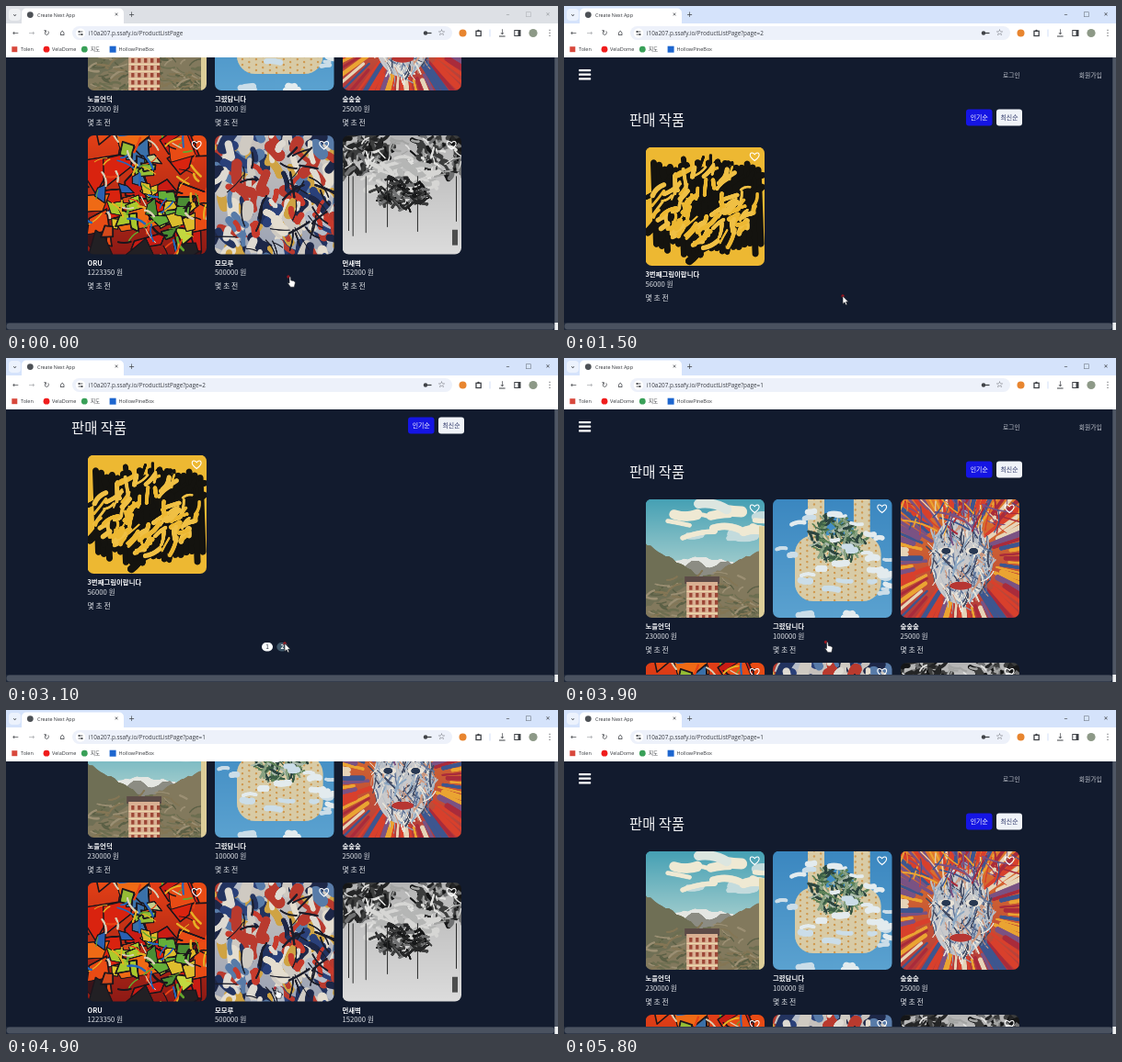
Recreate the animation shown at these times as an HTML page with a canvas. Size 600 by 353 pixels, loop 5900 ms.

```html
<!DOCTYPE html>
<html lang="ko">
<head>
<meta charset="utf-8">
<title>Gallery list</title>
<style>
html, body { margin: 0; width: 100%; height: 100%; overflow: hidden; background: #121b2e; }
canvas { display: block; width: 600px; height: 353px; }
</style>
</head>
<body>
<canvas id="stage"></canvas>
<script>
const W = 600, H = 353, LOOP = 5900, STEP = 100, TOP = 56, SIZE = 129.5, U = 130;
const KR = '"Noto Sans CJK KR", "Noto Sans CJK", sans-serif';
const UI = '"Open Sans", "Noto Sans CJK KR", sans-serif';
const SYM = '"DejaVu Sans", sans-serif';
const stage = document.getElementById('stage');
const dpr = window.devicePixelRatio || 1;
stage.width = W * dpr;
stage.height = H * dpr;
const ctx = stage.getContext('2d');

// ---- helpers ----
function random(seed) {
  return () => {
    seed = (seed + 0x6D2B79F5) | 0;
    let x = Math.imul(seed ^ (seed >>> 15), 1 | seed);
    x = (x + Math.imul(x ^ (x >>> 7), 61 | x)) ^ x;
    return ((x ^ (x >>> 14)) >>> 0) / 4294967296;
  };
}
function oval(c, fill, x, y, rx, ry = rx) {
  c.beginPath();
  c.ellipse(x, y, rx, ry, 0, 0, 7);
  c.fillStyle = fill;
  c.fill();
}
function box(c, fill, x, y, w, h, r = 0) {
  c.beginPath();
  c.roundRect(x, y, w, h, r);
  c.fillStyle = fill;
  c.fill();
}
function line(c, color, width, x0, y0, x1, y1) {
  c.beginPath();
  c.moveTo(x0, y0);
  c.lineTo(x1, y1);
  c.strokeStyle = color;
  c.lineWidth = width;
  c.stroke();
}
function text(s, x, y, size, color, font = KR, weight = 400, align = 'left') {
  ctx.font = `${weight} ${size}px ${font}`;
  ctx.textAlign = align;
  ctx.fillStyle = color;
  ctx.fillText(s, x, y);
}
function fade(c, from, to) {
  const g = c.createLinearGradient(0, 0, 0, U);
  g.addColorStop(0, from);
  g.addColorStop(1, to);
  box(c, g, 0, 0, U, U);
}
const pick = (rnd, list) => list[Math.floor(rnd() * list.length)];

// curved brush marks spread evenly over an ellipse
function strokes(c, rnd, n, colors, { x = 65, y = 65, rx = 72, ry = 72, len = 14, width = 3, angle = 0, spread = 6 }) {
  for (let i = 0; i < n; i++) {
    const turn = rnd() * 7, r = Math.sqrt(rnd());
    const a = angle + (rnd() - .5) * spread, l = len * (.5 + rnd()) / 2, bend = rnd() - .5;
    const dx = Math.cos(a) * l, dy = Math.sin(a) * l;
    c.save();
    c.translate(x + Math.cos(turn) * r * rx, y + Math.sin(turn) * r * ry);
    c.beginPath();
    c.moveTo(-dx, -dy);
    c.quadraticCurveTo(-dy * bend, dx * bend, dx, dy);
    c.strokeStyle = pick(rnd, colors);
    c.lineWidth = width * (.5 + rnd());
    c.stroke();
    c.restore();
  }
}
function ridge(c, rnd, fill, height) {
  c.beginPath();
  for (let x = -2; x <= U + 2; x += 4) c.lineTo(x, height(x) + rnd() * 3);
  c.lineTo(U, U);
  c.lineTo(0, U);
  c.fillStyle = fill;
  c.fill();
}
// angular outlined pieces around a point
function shards(c, rnd, n, colors, x, y, reach, size) {
  for (let i = 0; i < n; i++) {
    const px = x + (rnd() - .5) * reach, py = y + (rnd() - .5) * reach;
    c.beginPath();
    for (let k = 0; k < 4; k++) {
      const a = (k + rnd() * .8) * Math.PI / 2, r = size * (.4 + rnd() * .8);
      c.lineTo(px + Math.cos(a) * r, py + Math.sin(a) * r);
    }
    c.closePath();
    c.fillStyle = pick(rnd, colors);
    c.fill();
    c.strokeStyle = '#1b151c';
    c.lineWidth = 1 + rnd();
    c.stroke();
  }
}

// ---- pictures, each on a 130 unit square ----
function valley(c, rnd) {
  fade(c, '#45a0b4', '#e6eee0');
  strokes(c, rnd, 16, ['#dce6e0', '#efe9d3', '#c3dbdd'], { x: 80, y: 26, rx: 55, ry: 22, len: 26, width: 9, spread: .4 });
  ridge(c, rnd, '#e4e6e2', x => 62 + Math.abs(x - 60) * .15);
  ridge(c, rnd, '#8c8c83', x => 70 + Math.sin(x / 5) * 4);
  ridge(c, rnd, '#6f6f55', x => 47 + x * .6);
  ridge(c, rnd, '#82795d', x => 52 + (U - x) * .5);
  strokes(c, rnd, 190, ['#5c6046', '#9b8f73', '#847655', '#6c6e50'], { y: 112, ry: 32, len: 11, width: 1.8, spread: 1.5 });
  box(c, '#5c4b47', 43, 85, 38, 8);
  box(c, '#d9b093', 45, 91, 34, 39);
  for (let y = 95; y < U; y += 8) {
    box(c, '#ecd7ab', 45, y + 5.5, 34, 1.5);
    for (let x = 48; x < 77; x += 7) box(c, '#9c4736', x, y, 3.2, 4.5);
  }
  box(c, '#dccd98', 124, 30, 6, 100);
}
function bag(c, rnd) {
  fade(c, '#3b87c0', '#5ba2d0');
  c.save();
  c.beginPath();
  c.roundRect(38, -5, 18, 80, 5);
  c.roundRect(88, -5, 18, 80, 5);
  c.roundRect(24, 40, 94, 72, 20);
  c.clip();
  box(c, '#d8cba6', 0, 0, U, U);
  for (let i = 0; i < 360; i++) oval(c, '#cf9a52', i % 18 * 7.5, (i / 18 | 0) * 6 + i % 2 * 3, 1.2);
  c.restore();
  strokes(c, rnd, 170, ['#3d6048', '#5d8257', '#88a282', '#a9b9ab', '#2c4540'], { x: 69, y: 44, rx: 30, ry: 24, len: 9, width: 2.2 });
  strokes(c, rnd, 38, ['#e3ebee', '#cbdde8'], { len: 10, width: 5, spread: .3 });
}
function mask(c, rnd) {
  fade(c, '#e07a2c', '#b23a3c');
  const hues = ['#d8402c', '#eaa432', '#3d568f', '#e6d4b8', '#a92b3b', '#7a5283'];
  for (let i = 0; i < 80; i++) {
    const a = i * Math.PI / 40, r = 35 + rnd() * 25;
    line(c, pick(rnd, hues), 2 + rnd() * 5, 65 + Math.cos(a) * r, 65 + Math.sin(a) * r, 65 + Math.cos(a) * 95, 65 + Math.sin(a) * 95);
  }
  oval(c, '#c9c9cb', 65, 67, 31, 48);
  strokes(c, rnd, 230, ['#e9e5da', '#8ca7c2', '#5f7499', '#cf9a80', '#b6bec6', '#414a62'], { y: 67, rx: 34, ry: 50, len: 16, width: 1.4, angle: 1.5, spread: 2 });
  for (const x of [50, 80]) {
    oval(c, '#e8e2d7', x, 57, 9, 4);
    oval(c, '#283852', x, 57, 5, 3.5);
  }
  oval(c, '#b73632', 66, 95, 12, 4.5);
  strokes(c, rnd, 60, hues, { y: 14, ry: 20, len: 26, width: 1.4, angle: 1.2, spread: 2 });
}
function cubes(c, rnd) {
  fade(c, '#e23f16', '#8e1a15');
  shards(c, rnd, 22, ['#d9230f', '#ef6a15', '#c91c14', '#e84b14'], 65, 50, 135, 26);
  shards(c, rnd, 12, ['#3a141a', '#701319', '#222024'], 65, 118, 120, 18);
  shards(c, rnd, 13, ['#3a70a8', '#95bd35', '#6aa944', '#c5cf8b'], 60, 32, 36, 12);
  shards(c, rnd, 12, ['#a9c92c', '#2960b2', '#e1c72a', '#d4491b'], 36, 82, 44, 11);
  shards(c, rnd, 16, ['#64ae39', '#c2d83f', '#4b8d34', '#ddbd2d'], 87, 85, 48, 12);
  strokes(c, rnd, 80, ['#e84416', '#2466bb', '#e7b124', '#65a82e', '#d9cfb4', '#1b151c'], { len: 13, width: 1.8 });
}
function patches(c, rnd) {
  fade(c, '#c9c3bd', '#9ba3b5');
  const hues = ['#e4ddcf', '#cfcac2', '#2a4079', '#22335f', '#1d2747', '#b5bcc8', '#b93a2e', '#587ba8', '#cfa343'];
  strokes(c, rnd, 300, hues, { rx: 95, ry: 95, len: 15, width: 9, angle: 1.4, spread: 2 });
  strokes(c, rnd, 25, ['#c73a2c', '#dedad2'], { len: 11, width: 6, angle: 1.4, spread: 2 });
  strokes(c, rnd, 40, ['#1b1d2a'], { len: 20, width: 1.8 });
}
function ink(c, rnd) {
  fade(c, '#b5b5b5', '#dcdcdc');
  const dark = ['#151617', '#242526', '#3c3d3d', '#707172'];
  for (const x of [5, 125]) strokes(c, rnd, 170, dark, { x, y: 14, rx: 48, ry: 32, len: 8, width: 4 });
  strokes(c, rnd, 70, ['#e2e2e0', '#a3a4a3'], { y: 25, rx: 68, ry: 25, len: 8, width: 2 });
  strokes(c, rnd, 60, ['#d6d6d4', '#b5b6b5'], { y: 47, rx: 38, ry: 22, len: 14, width: 5, spread: 1.5 });
  strokes(c, rnd, 110, dark, { y: 63, rx: 30, ry: 17, len: 9, width: 2.5, spread: 2.5 });
  for (let i = 0; i < 6; i++) line(c, '#292a2a', 1, 7 + i * i * 4.7, 45, 7 + i * i * 4.7, 85 + rnd() * 35);
  box(c, '#4c4d4d', 120, 103, 6, 17);
}
function graffiti(c, rnd) {
  fade(c, '#edb832', '#edb832');
  for (let x = 9; x < 124; x += 6) line(c, '#14130f', 7, x, 17 + rnd() * 10, x + 3, 103 + rnd() * 15);
  strokes(c, rnd, 60, ['#14130f'], { rx: 58, ry: 47, len: 26, width: 6, angle: 2, spread: 1.6 });
  strokes(c, rnd, 100, ['#edb832', '#f0c044'], { rx: 56, ry: 43, len: 14, width: 4, angle: 2.1, spread: 1.5 });
}
function paint(draw, seed) {
  const cv = document.createElement('canvas');
  cv.width = cv.height = U * 2;
  const c = cv.getContext('2d');
  c.scale(2, 2);
  c.lineCap = c.lineJoin = 'round';
  draw(c, random(seed));
  return cv;
}

const first = [
  ['노을언덕', 230000, valley], ['그렸답니다', 100000, bag], ['숲숲숲', 25000, mask],
  ['ORU', 1223350, cubes], ['모모루', 500000, patches], ['먼새벽', 152000, ink]
].map(([name, price, art], i) => ({ name, price, art: paint(art, 11 + i * 7) }));
const second = [{ name: '3번째그림이랍니다', price: 56000, art: paint(graffiti, 90) }];

// ---- browser frame ----
function icon(s, x, y, size, color = '#3f4247') {
  ctx.textBaseline = 'middle';
  text(s, x, y, size, color, SYM, 400, 'center');
  ctx.textBaseline = 'alphabetic';
}
function chrome(query, focused) {
  const g = '#3f4247', mid = 29.5, soft = focused ? g : '#9a9da2';
  box(ctx, focused ? '#d5e3fb' : '#dde0e5', 0, 0, W, 22);
  box(ctx, '#fff', 0, 19, W, TOP - 19);
  box(ctx, '#fff', 17, 2.5, 111, 19, [5, 5, 0, 0]);
  box(ctx, focused ? '#ecf2fd' : '#eff1f3', 3, 3, 13, 13, 4);
  icon('⌄', 9.5, 8.5, 8);
  oval(ctx, '#4d5156', 26.3, 9.6, 3.4);
  text('Create Next App', 34, 11.7, 5.4, '#303338', UI);
  icon('✕', 120, 9.6, 5.5);
  icon('+', 136.6, 9.6, 8);
  icon('–', 545.5, 9.6, 8, soft);
  icon('□', 567.7, 9.2, 7, soft);
  icon('✕', 589, 9.6, 6, soft);

  icon('←', 10.5, mid, 8);
  icon('→', 28, mid, 8, '#a7a9ad');
  icon('↻', 44, mid, 8);
  icon('⌂', 61, mid, 9);
  box(ctx, '#edf1fa', 72, 22, 413, 15, 7.5);
  oval(ctx, '#fff', 81, mid, 5.2);
  for (const d of [-1.5, 1.5]) {
    line(ctx, g, .8, 78.6, mid + d, 83.4, mid + d);
    oval(ctx, g, 81 + d, mid + d, 1);
  }
  text('i10a207.p.ssafy.io/ProductListPage' + query, 90, 31.7, 6.35, '#3b3e44', UI);
  oval(ctx, g, 456, mid, 2.2);
  line(ctx, g, 1.3, 457, mid, 462.5, mid);
  icon('☆', 473.6, mid, 9.5);
  oval(ctx, '#e8852f', 496.5, mid, 4);
  ctx.strokeStyle = g;
  ctx.strokeRect(511, mid - 2.2, 5.2, 5.2);
  oval(ctx, g, 513.5, mid - 2.5, 1.2);
  line(ctx, '#c8d8f5', .8, 526, 25.5, 526, 33.5);
  icon('↓', 539.3, mid - 1, 8);
  line(ctx, g, 1, 536, 33, 542.6, 33);
  ctx.strokeRect(552.8, 26.5, 6.2, 6);
  box(ctx, g, 556.5, 26.5, 2.5, 6);
  oval(ctx, '#8d9987', 573, mid, 4.6);
  icon('⋮', 591, mid, 9);

  box(ctx, '#d8483c', 6.3, 44.2, 6, 6);
  oval(ctx, '#f01c1c', 44, 47.2, 3.4);
  oval(ctx, '#39a058', 85.3, 47.2, 3.4);
  box(ctx, '#1d66cf', 112.6, 43.7, 7, 7);
  [['Tolen', 16], ['VelaDome', 50], ['지도', 92], ['HollowPineBox', 122.5]]
    .forEach(([s, x]) => text(s, x, 49.2, 5.5, '#34373c', UI));
}

// ---- web page ----
const heart = new Path2D('M0 4.4C-9 -2 -3.4 -7 0 -2.3C3.4 -7 9 -2 0 4.4Z');
const arrow = new Path2D('M0 0V8.6L2 6.8L3.4 9.8L4.8 9.2L3.5 6.3H6Z');
const hand = new Path2D('M-1 0H.4L.8 4L3.6 4.5L5.5 6L4.3 11.2H.3L-3.2 6.4L-1 7Z');

function shape(path, x, y, edge, width, fill) {
  ctx.save();
  ctx.translate(x, y);
  if (fill) { ctx.fillStyle = fill; ctx.fill(path); }
  ctx.strokeStyle = edge;
  ctx.lineWidth = width;
  ctx.stroke(path);
  ctx.restore();
}
function card({ name, price, art }, i) {
  const x = 88.5 + i % 3 * 138.5, y = 153.5 + Math.floor(i / 3) * 178.5;
  ctx.save();
  ctx.beginPath();
  ctx.roundRect(x, y, SIZE, SIZE, 7);
  ctx.clip();
  ctx.drawImage(art, x, y, SIZE, SIZE);
  ctx.restore();
  shape(heart, x + 118.7, y + 10.6, '#fff', 1.1);
  text(name, x, y + 141.8, 7.4, '#f4f5f7', KR, 700);
  text(price + ' 원', x, y + 152.4, 7.7, '#dfe2e7');
  text('몇 초 전', x, y + 167, 7.9, '#dfe2e7');
}
function pill(label, x, y, active) {
  box(ctx, active ? '#40586a' : '#fafbfc', x - 6, y - 4.7, 12, 9.4, 4.7);
  text(label, x, y + 2.4, 6.5, active ? '#fff' : '#27313e', KR, active ? 700 : 400, 'center');
}
function button(label, x, w, fill, color) {
  box(ctx, fill, x, 112.4, w, 18, 3);
  text(label, x + w / 2, 124, 6.9, color, KR, 400, 'center');
}
function page(num, scroll) {
  ctx.save();
  box(ctx, '#121b2e', 0, TOP, W, H - TOP);
  ctx.translate(0, -scroll);
  for (let i = 0; i < 3; i++) box(ctx, '#fff', 16, 69 + i * 4.6, 13.2, 2.2, .6);
  text('로그인', 477, 78.2, 6.8, '#c4c8d0');
  text('회원가입', 559.8, 78.2, 6.8, '#c4c8d0');
  text('판매 작품', 71, 130.3, 15.4, '#f4f5f7');
  button('인기순', 437, 28.5, '#1515e4', '#fff');
  button('최신순', 470, 28, '#f0f3f8', '#30396b');
  (num === 1 ? first : second).forEach(card);
  const y = num === 1 ? 542 : 362.7;
  pill('1', 284, y, num === 1);
  pill('2', 300.3, y, num === 2);
  if (num === 1) text('© 2024 Soir Douvel. All rights reserved.', 303, y + 17.8, 7.2, '#e3e6ea', KR, 400, 'center');
  ctx.restore();

  box(ctx, '#4f5765', 596.3, TOP, 3.7, 289);
  box(ctx, '#20293a', 0, 345, 596.3, 8);
  box(ctx, '#4a5260', .5, 345.6, 595.5, 6.8, 3.4);
  box(ctx, '#eef0f2', 596.3, 345, 3.7, 8);
}

// ---- timeline ----
const ramp = (t, from, to) => Math.min(1, Math.max(0, (t - from) / (to - from)));

function scrollAt(t) {
  if (t < 1300) return 191 + 37 * ramp(t, 100, 600);
  if (t < 3600) return 88.5 * ramp(t, 1900, 2300) - 40.5 * ramp(t, 2500, 3100);
  return 190 * ramp(t, 3900, 4400) - 46 * ramp(t, 4700, 4900) - 144 * ramp(t, 4900, 5200);
}
// the pointer glides between rests: [start, end, dx, dy]
const glides = [[600, 900, -6, 21], [2000, 2300, 0, -5], [3100, 3400, -16.5, -1.5], [3900, 4400, 8, -6.5]];

function pointer(t) {
  let x = 309, y = 295;
  for (const [from, to, dx, dy] of glides) {
    x += dx * ramp(t, from, to);
    y += dy * ramp(t, from, to);
  }
  const pressing = t < 1300 || t >= 3400;
  oval(ctx, 'rgba(176,20,28,.85)', x - (pressing ? 2 : 0), y, 1.7);
  shape(pressing ? hand : arrow, x, y, '#1c1d22', .6, '#fff');
}

function frame(now) {
  const t = Math.floor(now % LOOP / STEP) * STEP;
  const num = t >= 1300 && t < 3600 ? 2 : 1;
  ctx.setTransform(dpr, 0, 0, dpr, 0, 0);
  page(num, scrollAt(t));
  chrome(t < 1300 ? '' : '?page=' + num, t >= 800);
  if (t < 5400) pointer(t);
  requestAnimationFrame(frame);
}
requestAnimationFrame(frame);
</script>
</body>
</html>
```
